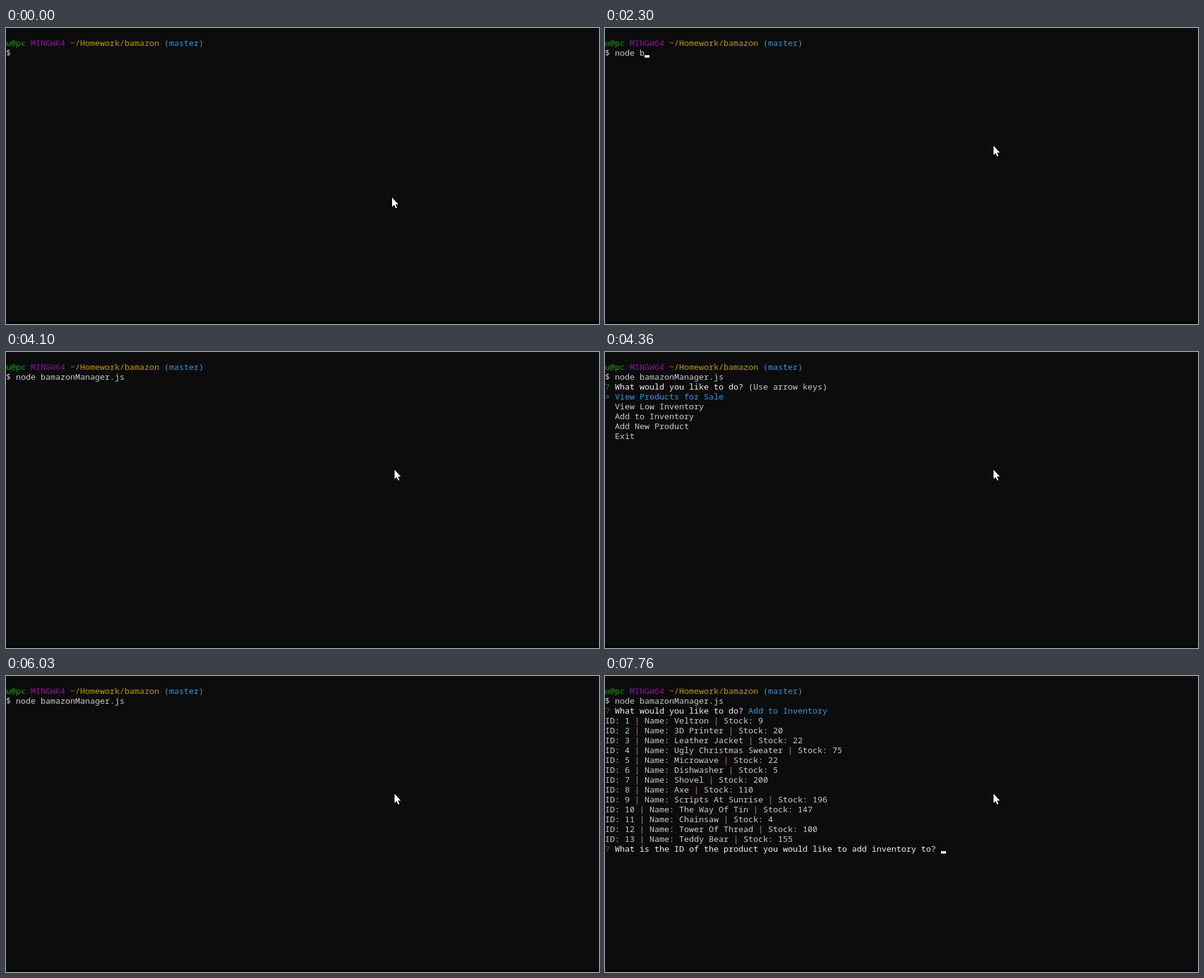
Animation of 960 by 480 pixels, one loop 8 s. Source, as an HTML page with a canvas:

```html
<!DOCTYPE html>
<html lang="en">
<head>
<meta charset="utf-8">
<title>Terminal session</title>
<style>
html, body { margin: 0; width: 100%; height: 100%; overflow: hidden; background: #0c0c0c; }
canvas { display: block; }
</style>
</head>
<body>
<canvas id="stage" width="960" height="480"></canvas>
<script>
const ctx = document.getElementById('stage').getContext('2d');
const LOOP = 8000, CELL_W = 8, CELL_H = 16;
const BG = '#0c0c0c', GREY = '#cccccc', WHITE = '#f2f2f2', GREEN = '#13a10e',
  PURPLE = '#881798', YELLOW = '#c19c00', BLUE = '#3a96dd', PIPE = '#cf934f';

const COMMAND = 'node bamazonManager.js';
const QUESTION = 'What would you like to do? ';
const ID_QUESTION = 'What is the ID of the product you would like to add inventory to? ';
const MENU = ['View Products for Sale', 'View Low Inventory', 'Add to Inventory', 'Add New Product', 'Exit'];
const PRODUCTS = [
  ['Veltron', 9], ['3D Printer', 20], ['Leather Jacket', 22], ['Ugly Christmas Sweater', 75],
  ['Microwave', 22], ['Dishwasher', 5], ['Shovel', 200], ['Axe', 110],
  ['Scripts At Sunrise', 196], ['The Way Of Tin', 147], ['Chainsaw', 4],
  ['Tower Of Thread', 100], ['Teddy Bear', 155]
];

// Latest entry of a [time, value] list that has begun at time t.
const at = (steps, t) => steps.reduce((value, step) => t >= step[0] ? step[1] : value, steps[0][1]);

const POINTER = [
  [0, [625, 275]], [500, [624, 262]], [570, [623, 230]], [630, [627, 200]], [700, [629, 191]]
];

// Number of characters typed between two times, one key per equal step.
const typed = (t, start, end, count) =>
  t < start ? 0 : Math.min(count, 1 + Math.floor((t - start) / (end - start) * (count - 1) + 1e-6));

function commandAt(t) {
  if (t >= 3230) return COMMAND;
  if (t >= 2960) return 'node bamazonm';
  return COMMAND.slice(0, typed(t, 1230, 1500, 5) + typed(t, 2230, 2760, 7));
}

// Cell [column, row] of the text cursor, or null while it is hidden.
function cursorAt(t) {
  const afterText = [2 + commandAt(t).length, 2];
  return at([
    [0, null], [1230, afterText], [1960, null], [2230, afterText], [3160, [14, 2]],
    [3230, [25, 2]], [3560, null], [3630, [0, 3]], [4100, null],
    [6100, [68, 17]], [6230, null], [6700, [68, 17]], [7300, null], [7760, [68, 17]]
  ], t);
}

// Prints alternating text and colour arguments along one row.
function print(row, ...parts) {
  let col = 0;
  for (let i = 0; i < parts.length; i += 2) {
    ctx.fillStyle = parts[i + 1];
    ctx.fillText(parts[i], col * CELL_W, row * CELL_H + 13);
    col += parts[i].length;
  }
}

function drawMenu(t) {
  const selected = at([[4360, 0], [4830, 1], [5100, 2]], t);
  print(3, '? ', GREEN, QUESTION, WHITE, t < 4830 ? '(Use arrow keys)' : '', GREY);
  MENU.forEach((item, i) => {
    const active = i === selected;
    print(4 + i, (active ? '> ' : '  ') + item, active ? BLUE : GREY);
  });
}

function drawProducts() {
  print(3, '? ', GREEN, QUESTION, WHITE, MENU[2], BLUE);
  PRODUCTS.forEach(([name, stock], i) => {
    print(4 + i, `ID: ${i + 1} `, GREY, '|', PIPE, ` Name: ${name} `, GREY, '|', PIPE, ` Stock: ${stock}`, GREY);
  });
  print(17, '? ', GREEN, ID_QUESTION, WHITE);
}

function drawCursor(cell) {
  if (!cell) return;
  ctx.globalCompositeOperation = 'difference';
  ctx.fillStyle = '#fff';
  ctx.fillRect(cell[0] * CELL_W, cell[1] * CELL_H + 12, CELL_W, 4);
  ctx.globalCompositeOperation = 'source-over';
}

function drawPointer([x, y]) {
  const outline = [[0, 0], [0, 15], [3.4, 11.8], [6, 17.4], [8, 16.5], [5.6, 11], [10.2, 11]];
  ctx.beginPath();
  outline.forEach(([dx, dy]) => ctx.lineTo(x + dx, y + dy));
  ctx.closePath();
  ctx.lineWidth = 2;
  ctx.strokeStyle = '#000';
  ctx.stroke();
  ctx.fillStyle = '#fff';
  ctx.fill();
}

function draw(t) {
  ctx.fillStyle = BG;
  ctx.fillRect(0, 0, 960, 480);
  ctx.fillStyle = '#040204';
  ctx.fillRect(0, 477, 960, 3);
  ctx.font = `${CELL_W / 0.6}px "Noto Sans Mono", "DejaVu Sans Mono", monospace`;

  print(1, 'u@pc ', GREEN, 'MINGW64 ', PURPLE, '~/Homework/bamazon ', YELLOW, '(master)', BLUE);
  print(2, '$ ' + commandAt(t), GREY);
  if (t >= 6100) drawProducts();
  else if (t >= 4360 && t < 6030) drawMenu(t);
  drawCursor(cursorAt(t));
  drawPointer(at(POINTER, t));
}

const start = performance.now();
function tick() {
  draw((performance.now() - start) % LOOP);
  requestAnimationFrame(tick);
}
tick();
</script>
</body>
</html>
```
